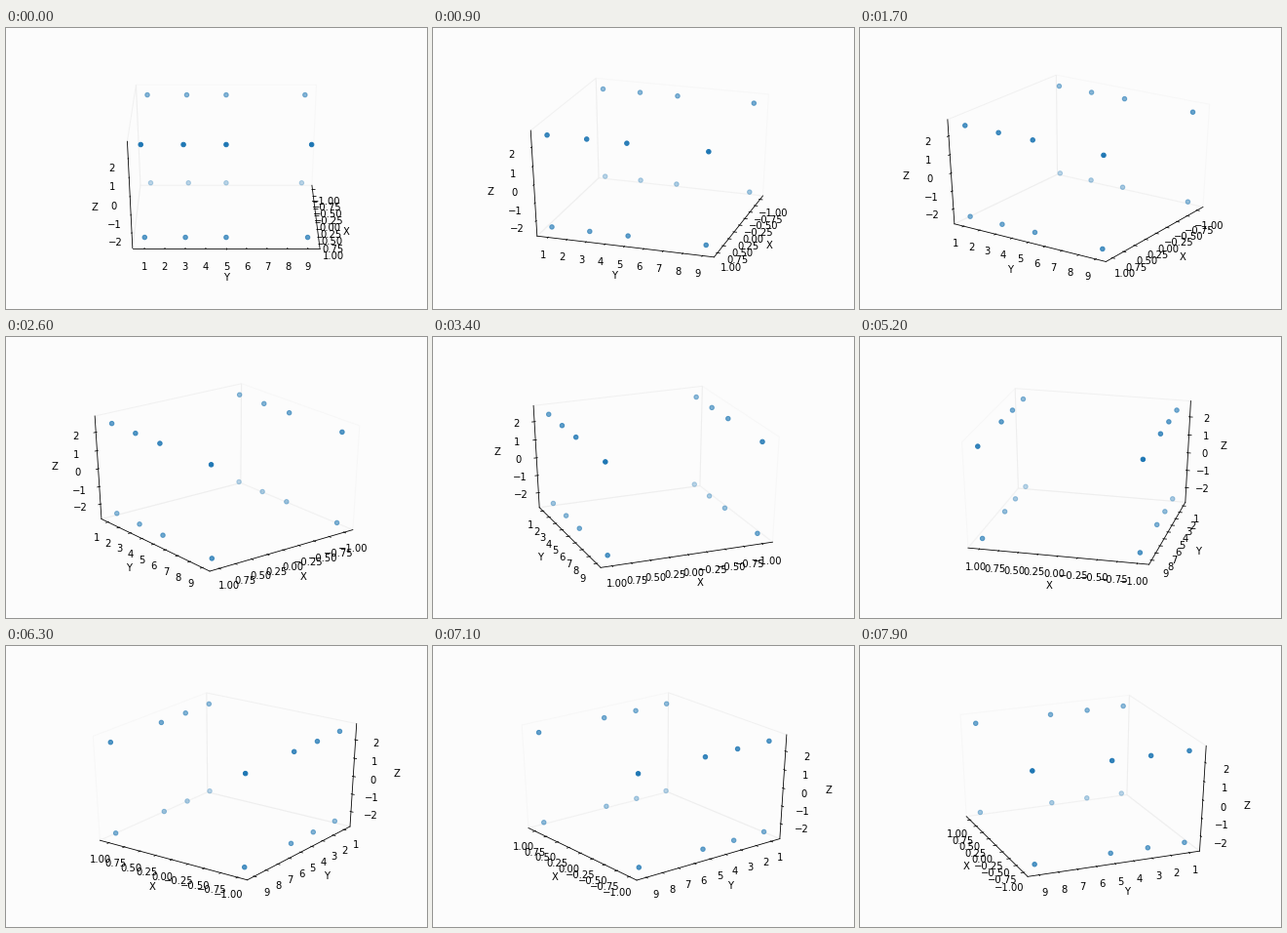
A matplotlib script that plays this animation: 432 px wide and 288 px high, repeating every 8000 ms.

```python
from itertools import product

import matplotlib.pyplot as plt
import numpy as np
from matplotlib.animation import FuncAnimation
from matplotlib.collections import LineCollection

FRAMES = 80
STEP = 2              # degrees of azimuth per frame
ELEV = np.radians(30)
DIST = 10
EDGE = 0.5 + 1 / 48   # half size of the box; the data limits sit at 0.5
DELTA = 1 / 12
BLUE = (0x1F / 255, 0x77 / 255, 0xB4 / 255)

CENTER = np.array([0, 5, 0])
RANGE = np.array([2, 8, 5]) * 1.1
TICKS = [np.arange(-4, 5) / 4, np.arange(1, 10), np.arange(-2, 3)]
FORMATS = ["{:.2f}", "{:d}", "{:d}"]
PANE_GRAY = [0.95, 0.90, 0.925]
TICK_DIR = [1, 0, 0]

points = np.array(list(product([-1, 1], [1, 3, 5, 9], [-2.5, 2.5])))
points = (points - CENTER) / RANGE

plt.rcParams.update({"font.family": "DejaVu Sans", "font.size": 10})
fig = plt.figure(figsize=(6, 4), dpi=72, facecolor="#fcfcfc")
ax = fig.add_axes([0.125, 0.125, 0.775, 0.755])
ax.set(xlim=(-0.095, 0.09), ylim=(-0.095, 0.09))
ax.axis("off")


def make_text(label, **kw):
    return ax.text(0, 0, label.replace("-", "\u2212"), ha="center", **kw)


panes = [
    ax.add_patch(plt.Polygon(np.zeros((4, 2)), fill=False, lw=1, alpha=0.5,
                             edgecolor=str(g), clip_on=False, zorder=1))
    for g in PANE_GRAY
]
spines = [ax.plot([], [], color="black", lw=0.8, clip_on=False, zorder=2)[0]
          for _ in range(3)]
marks = [ax.add_collection(LineCollection([], colors="black", linewidths=0.8,
                                          clip_on=False, zorder=2))
         for _ in range(3)]
numbers = [[make_text(f.format(v), va="top") for v in t]
           for f, t in zip(FORMATS, TICKS)]
names = [make_text(c, va="center") for c in "XYZ"]
dots = ax.scatter(*np.zeros((2, len(points))), s=20, linewidths=1,
                  clip_on=False, zorder=4)


def project(p, azim):
    """Perspective view of box coordinates: screen positions and distance."""
    ca, sa, ce, se = np.cos(azim), np.sin(azim), np.cos(ELEV), np.sin(ELEV)
    right = np.array([-sa, ca, 0])
    up = np.array([-se * ca, -se * sa, ce])
    toward = np.array([ce * ca, ce * sa, se])
    p = np.asarray(p, float)
    depth = DIST - p @ toward
    return np.stack([p @ right, p @ up], axis=-1) / depth[..., None], depth


def push_out(p, amount, axis):
    """Move away from the centre along the two other directions."""
    shift = np.where(p < 0, -amount, amount)
    shift[..., axis] = 0
    return p + shift


def draw_pane(axis, far, azim):
    a, b = [k for k in range(3) if k != axis]
    quad = np.tile(far, (4, 1))
    quad[:, a] = EDGE * np.array([-1, 1, 1, -1])
    quad[:, b] = EDGE * np.array([-1, -1, 1, 1])
    panes[axis].set_xy(project(quad, azim)[0])


def draw_axis(axis, far, azim):
    start = far.copy()
    start[TICK_DIR[axis]] *= -1
    end = start.copy()
    end[axis] *= -1
    spines[axis].set_data(*project([start, end], azim)[0].T)

    at = np.tile(start, (len(TICKS[axis]), 1))
    at[:, axis] = (TICKS[axis] - CENTER[axis]) / RANGE[axis]
    along = np.zeros(3)
    along[TICK_DIR[axis]] = np.sign(far[TICK_DIR[axis]]) * DELTA
    inner = project(at + 0.1 * along, azim)[0]
    outer = project(at - 0.2 * along, azim)[0]
    marks[axis].set_segments(np.stack([inner, outer], axis=1))

    for text, xy in zip(numbers[axis],
                        project(push_out(at, DELTA, axis), azim)[0]):
        text.set_position(xy)
    middle = push_out((start + end) / 2, 2.173 * DELTA, axis)
    names[axis].set_position(project(middle, azim)[0])


def update(i):
    azim = np.radians(STEP * i)
    far = EDGE * np.array([1 if np.cos(azim) < -1e-9 else -1,
                           1 if np.sin(azim) < -1e-9 else -1, -1])
    for axis in range(3):
        draw_pane(axis, far, azim)
        draw_axis(axis, far, azim)

    xy, depth = project(points, azim)
    z = -1 / depth
    alpha = 1 - 0.7 * (z - z.min()) / np.ptp(z)
    colors = [(*BLUE, a) for a in alpha]
    dots.set_offsets(xy)
    dots.set_facecolor(colors)
    dots.set_edgecolor(colors)
    return []


anim = FuncAnimation(fig, update, frames=FRAMES, interval=100,
                     init_func=lambda: update(0), repeat=True, repeat_delay=0)
plt.show()
```
